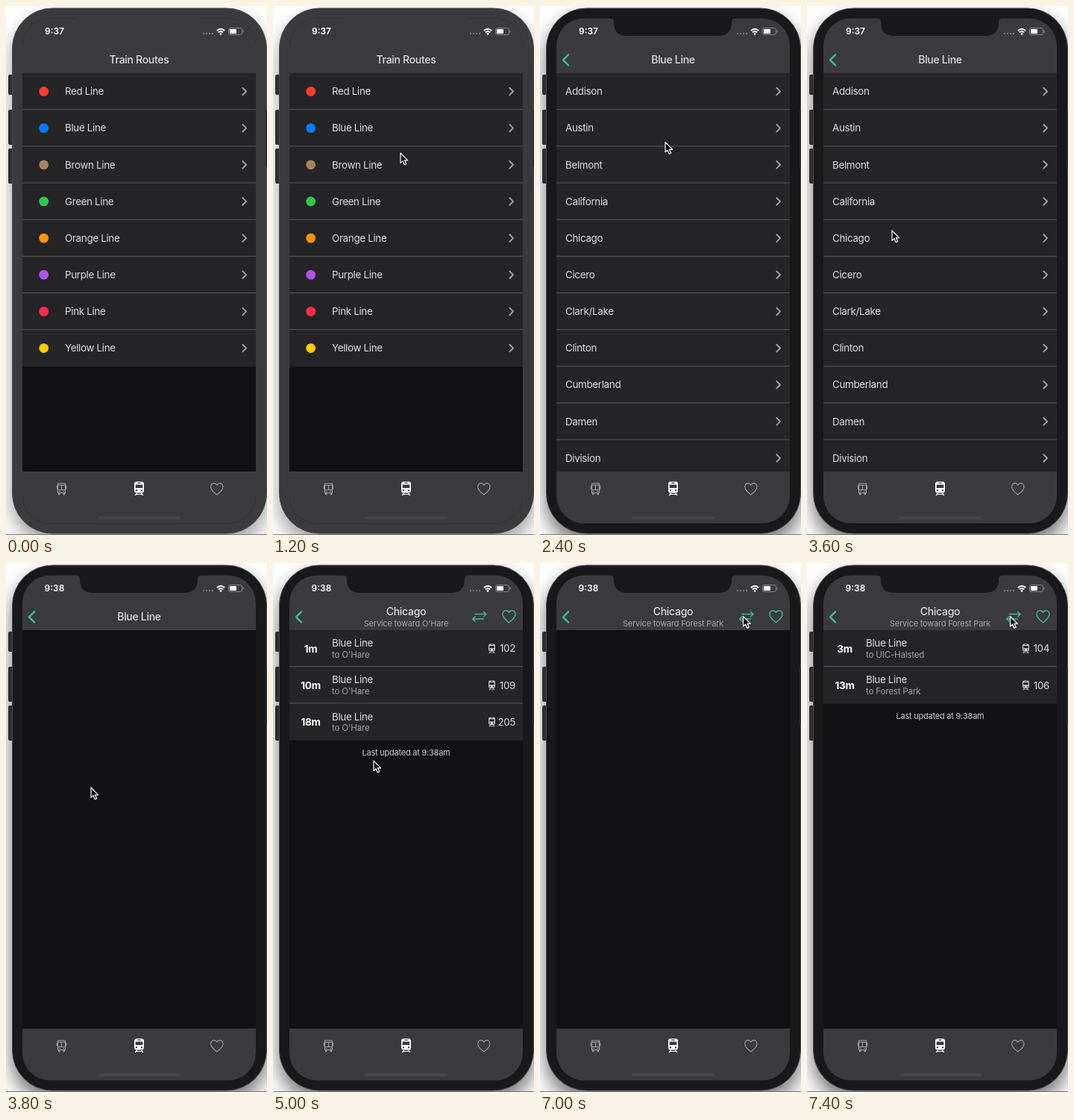
These frames come from a looping animation (350 px wide and 709 px high, 8 s). An HTML page:

```html
<!DOCTYPE html>
<html lang="en">
<head>
<meta charset="utf-8">
<title>Train routes</title>
<style>
html, body { margin: 0; width: 100%; height: 100%; overflow: hidden; background: #fff; }
svg { display: block; }
text { font: 13.4px Inter, sans-serif; letter-spacing: -.33px; fill: #dcdbdd; }
.title { font-size: 14px; font-weight: 500; letter-spacing: -.3px; text-anchor: middle; }
.sub { font-size: 11px; letter-spacing: -.2px; fill: #a5a4a6; text-anchor: middle; }
.dest { font-size: 11.6px; letter-spacing: -.2px; fill: #a09fa1; }
.note { font-size: 11px; letter-spacing: -.23px; fill: #cfced0; text-anchor: middle; }
.mins { font-size: 13.6px; font-weight: 700; fill: #fff; text-anchor: middle; }
.clock { font-size: 12px; font-weight: 600; letter-spacing: 0; fill: #fff; text-anchor: middle; }
.run { text-anchor: end; }
.line { fill: none; stroke-linecap: round; stroke-linejoin: round; }
.green { stroke: #3fba95; }
</style>
</head>
<body>
<svg width="350" height="709" viewBox="0 0 350 709">
  <defs>
    <clipPath id="screen"><rect x="22" y="16.5" width="313" height="677" rx="37"/></clipPath>
    <clipPath id="body"><rect x="22" y="90" width="313" height="534"/></clipPath>
    <filter id="blur" x="-30%" y="-30%" width="160%" height="160%"><feGaussianBlur stdDeviation="13"/></filter>
    <path id="heart" d="M0 8C-4 5-8.5 1.5-8.5-3C-8.5-6-6.3-8-4-8C-2.2-8-.8-7 0-5.3C.8-7 2.2-8 4-8C6.3-8 8.5-6 8.5-3C8.5 1.5 4 5 0 8Z"/>
    <path id="train" fill-rule="evenodd" d="M-3.5-9h7q3 .3 3 3v9q0 2.5-2.5 3h-8q-2.5-.5-2.5-3v-9q0-2.7 3-3ZM-2-7.7v1.2h4v-1.2ZM-4.8-5v4.5h9.6V-5ZM-3.5 1.5a1.2 1.2 0 1 0 .01 0ZM3.5 1.5a1.2 1.2 0 1 0 .01 0ZM-4 6.6h1.8l-.6 1h5.6l-.6-1H4l2 3H4.3l-.7-1h-7.2l-.7 1H-6Z"/>
  </defs>

  <rect id="shadow" x="8" y="16" width="342" height="705" rx="54" filter="url(#blur)"/>
  <g fill="#2e2d30">
    <rect x="3" y="92" width="8" height="27" rx="2"/>
    <rect x="3" y="139" width="8" height="47" rx="2"/>
    <rect x="3" y="191" width="8" height="47" rx="2"/>
  </g>
  <rect id="bezel" x="8.5" y="3" width="341" height="704" rx="54" stroke="#4a494c"/>
  <rect x="348" y="140" width="2" height="76" fill="#2e2d30"/>
  <path d="M0 708.5H350" stroke="#777"/>

  <g clip-path="url(#screen)">
    <rect x="22" y="16" width="313" height="678" fill="#121113"/>
    <g id="content" clip-path="url(#body)"></g>
    <rect x="22" y="16" width="313" height="74" fill="#3b3a3c"/>
    <rect x="22" y="624" width="313" height="70" fill="#3b3a3c"/>
    <rect x="123" y="684" width="111" height="4" rx="2" fill="#464547"/>
  </g>
  <path id="notch" d="M93 16q6 0 6 6q0 18 18 18h122q18 0 18-18q0-6 6-6Z"/>

  <text id="clock" class="clock" x="65" y="38.4"></text>
  <path d="M265 37h14" class="line" stroke="#777679" stroke-width="2.4" stroke-dasharray="0 4"/>
  <g class="line" stroke="#fff" stroke-width="1.8" style="stroke-linecap:butt">
    <path d="M282.8 33q5.2-4.6 10.4 0M284.8 35.3q3.2-2.7 6.4 0"/>
    <circle cx="288" cy="37.3" r=".6"/>
  </g>
  <rect x="298.5" y="29.5" width="18" height="9" rx="2.5" fill="none" stroke="#858487"/>
  <rect x="300" y="31" width="9" height="6" rx="1" fill="#fff"/>
  <path d="M318.3 32.5v3" stroke="#858487" stroke-width="1.3"/>

  <g id="header"></g>

  <g class="line" stroke="#a3a2a4" stroke-width="1.1">
    <path d="M69.5 640h10v12.5h-10ZM69.5 642.3h10M74.5 642.3v6M69.5 648.5h10M68.3 643v4M80.7 643v4M70.5 653v1.7h1.5v-1.7M77 653v1.7h1.5v-1.7M71.3 650.5h1M76.8 650.5h1"/>
    <use href="#heart" transform="translate(282.8 647.3) scale(.96)"/>
  </g>
  <use href="#train" x="178.5" y="646.5" fill="#fff"/>
  <path id="cursor" d="M0 0v13.4l3-2.8 2.3 5.2 2.4-1-2.3-5H9.7Z" fill="#111" stroke="#fff" stroke-width="1.2" stroke-linejoin="round"/>
</svg>

<script>
const LOOP = 8000, STEP = 200, PITCH = 49.15;
const el = id => document.getElementById(id);
const text = (cls, x, y, s) => `<text class="${cls}" x="${x}" y="${y}">${s}</text>`;

const routes = [['Red', '#fc3d33'], ['Blue', '#077aff'], ['Brown', '#a2845e'], ['Green', '#2dc84d'],
  ['Orange', '#fd9307'], ['Purple', '#b450eb'], ['Pink', '#ff2d4b'], ['Yellow', '#ffcc0a']];
const stations = ['Addison', 'Austin', 'Belmont', 'California', 'Chicago', 'Cicero', 'Clark/Lake',
  'Clinton', 'Cumberland', 'Damen', 'Division'];
const outbound = [['1m', "O'Hare", 102], ['10m', "O'Hare", 109], ['18m', "O'Hare", 205]];
const inbound = [['3m', 'UIC-Halsted', 104], ['13m', 'Forest Park', 106]];

// Lays items out as table rows; cell() draws each one relative to its row.
const table = (items, cell) => items.map((item, i) =>
  `<g transform="translate(0 ${90 + i * PITCH})">
    <rect x="22" width="313" height="${PITCH + .3}" fill="#252426"/>
    ${i ? '<path d="M22 -.4H335" stroke="#5b5a5c"/>' : ''}${cell(item)}</g>`).join('');

const chevron = '<path class="line" d="M317.3 19.7l4.8 4.8-4.8 4.8" stroke="#9d9c9f" stroke-width="2"/>';

const routeList = table(routes, ([name, color]) =>
  `<circle cx="50.7" cy="24.5" r="6.4" fill="${color}"/>` + text('', 79, 29.3, name + ' Line') + chevron);

const stationList = table(stations, name => text('', 34, 29.3, name) + chevron);

const arrivals = list => table(list, ([mins, dest, run]) =>
  text('mins', 50.5, 29.5, mins) + text('', 79, 22.3, 'Blue Line') + text('dest', 79, 37.2, 'to ' + dest) +
  `<use href="#train" transform="translate(293.5 24.5) scale(.68)" fill="#d0cfd1"/>` +
  text('run', 325, 29.4, run)) +
  text('note', 178.5, 90 + list.length * PITCH + 21, 'Last updated at 9:38am');

const back = '<path class="line green" d="M38 65.3l-7 7 7 7" stroke-width="2.5"/>';
const routesHead = text('title', 178.5, 77, 'Train Routes');
const lineHead = back + text('title', 178.5, 77, 'Blue Line');
const stopHead = toward => back + text('title', 178.5, 70, 'Chicago') +
  text('sub', 178.5, 85, 'Service toward ' + toward) +
  `<g class="line green" stroke-width="1.4">
    <path d="M271 68.5h15m-3.5-3.3l3.5 3.3-3.5 3.3M282.5 75h-15m3.5-3.3l-3.5 3.3 3.5 3.3"/>
    <use href="#heart" x="316.5" y="71.7"/></g>`;

// [start, header, content]
const scenes = [
  [0, routesHead, routeList],
  [2200, routesHead, ''],
  [2400, lineHead, stationList],
  [3800, lineHead, ''],
  [4000, stopHead("O'Hare"), ''],
  [4200, stopHead("O'Hare"), arrivals(outbound)],
  [7000, stopHead('Forest Park'), ''],
  [7200, stopHead('Forest Park'), arrivals(inbound)]
];

// [time, x, y] of the pointer tip
const path = [[200, 45, 622], [1200, 171, 197], [2000, 168, 182.5], [2400, 168, 182.5], [3600, 114, 301],
  [4800, 114, 301], [5000, 135, 265], [5400, 44, 127], [5800, 62, 196], [6000, 139, 211],
  [6900, 272.5, 71.5], [LOOP, 272.5, 71.5]];

function pointer(t) {
  const i = path.findIndex(p => p[0] > t);
  const [t0, x0, y0] = path[i - 1], [t1, x1, y1] = path[i];
  const u = (t - t0) / (t1 - t0), e = u * u * (3 - 2 * u);
  return [x0 + (x1 - x0) * e, y0 + (y1 - y0) * e];
}

let scene, last;
function draw(t) {
  const active = t >= 1600;
  const next = scenes.filter(s => s[0] <= t).pop();
  if (next !== scene) {
    scene = next;
    el('header').innerHTML = scene[1];
    el('content').innerHTML = scene[2];
  }
  el('clock').textContent = t < 3800 ? '9:37' : '9:38';
  for (const id of ['bezel', 'notch']) el(id).setAttribute('fill', active ? '#19181a' : '#3b3a3c');
  el('shadow').setAttribute('opacity', active ? .55 : .38);
  el('cursor').setAttribute('visibility', t < STEP ? 'hidden' : 'visible');
  if (t >= STEP) el('cursor').setAttribute('transform', `translate(${pointer(t)})`);
}

function tick() {
  const t = Math.floor(performance.now() % LOOP / STEP) * STEP;
  if (t !== last) draw(last = t);
  requestAnimationFrame(tick);
}
tick();
</script>
</body>
</html>
```
